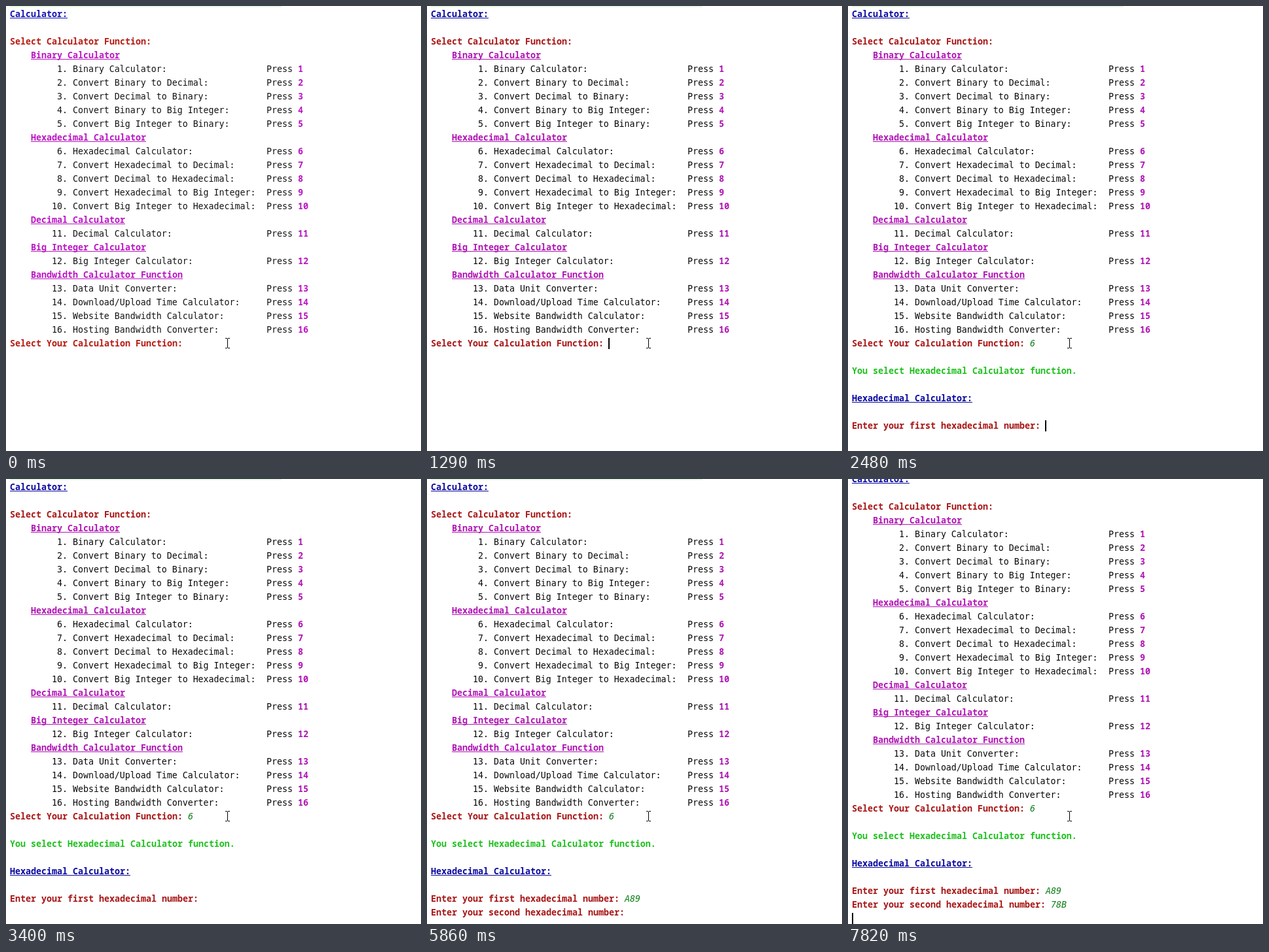
These frames come from a looping animation (634x681 px, 8 s). An HTML page with a canvas:

```html
<!DOCTYPE html>
<html lang="en">
<head>
<meta charset="utf-8">
<title>Calculator console</title>
<style>
  html, body { margin: 0; width: 100%; height: 100%; overflow: hidden; background: #fff; }
  canvas { display: block; }
</style>
</head>
<body>
<canvas id="stage" width="634" height="681"></canvas>
<script>
const LOOP = 8000, LEFT = 6, CELL = 8, LINE = 21, BASELINE = 17;
const REGULAR = '13.28px "DejaVu Sans Mono", monospace';
const ITALIC = 'italic ' + REGULAR;
const BOLD = '600 13.33px "Noto Sans Mono", monospace';
const BRIGHT = { text: '#141414', red: '#b71c14', magenta: '#bb16c4', blue: '#1414b4' };
const NORMAL = { text: '#080808', red: '#a81616', magenta: '#b014b4', blue: '#0a0aa0' };
const GREEN = '#1fc01f', INPUT = '#0b7d16';

const menu = [
  ['Binary Calculator', 'Binary Calculator', 'Convert Binary to Decimal', 'Convert Decimal to Binary',
    'Convert Binary to Big Integer', 'Convert Big Integer to Binary'],
  ['Hexadecimal Calculator', 'Hexadecimal Calculator', 'Convert Hexadecimal to Decimal',
    'Convert Decimal to Hexadecimal', 'Convert Hexadecimal to Big Integer', 'Convert Big Integer to Hexadecimal'],
  ['Decimal Calculator', 'Decimal Calculator'],
  ['Big Integer Calculator', 'Big Integer Calculator'],
  ['Bandwidth Calculator Function', 'Data Unit Converter', 'Download/Upload Time Calculator',
    'Website Bandwidth Calculator', 'Hosting Bandwidth Converter']
];

// Start time, then row and column; without a position the caret is hidden.
const caretSteps = [
  [0], [310, 24, 34], [790], [1290, 24, 34], [1790, 24, 35], [2180, 25, 0],
  [2480, 30, 37], [3400], [3680, 30, 38], [4180, 30, 39], [4380, 30, 40], [4870],
  [5050, 31, 0], [5240, 31, 38], [5860], [6250, 31, 39], [6530, 31, 40], [7030, 31, 41],
  [7820, 32, 0]
];

const ctx = document.getElementById('stage').getContext('2d');

function rect(color, x, y, w, h) {
  ctx.fillStyle = color;
  ctx.fillRect(x, y, w, h);
}

function write(row, col, text, color, font = BOLD) {
  ctx.font = font;
  ctx.fillStyle = color;
  ctx.fillText(text, LEFT + col * CELL, BASELINE + row * LINE);
}

function heading(row, col, text, color) {
  write(row, col, text, color);
  rect(color, LEFT + col * CELL, BASELINE + 1 + row * LINE, text.length * CELL, 1);
}

function typed(row, col, text, t, keyTimes) {
  const count = keyTimes.filter(time => t >= time).length;
  write(row, col, text.slice(0, count), INPUT, ITALIC);
}

function drawMenu(colors) {
  let row = 3, number = 1;
  for (const [title, ...items] of menu) {
    heading(row++, 4, title, colors.magenta);
    for (const item of items) {
      write(row, 8, `${number}.`.padStart(3) + ` ${item}:`, colors.text, REGULAR);
      write(row, 49, 'Press', colors.text, REGULAR);
      write(row++, 55, String(number++), colors.magenta);
    }
  }
}

function drawCaret(t) {
  const [, row, col] = caretSteps.filter(step => t >= step[0]).pop();
  if (row) rect('#000', Math.floor(LEFT + col * 7.98), 4 + row * LINE, 2, 17);
}

function drawPointer() {
  rect('#000', 338, 509, 1, 14);
  for (const y of [508, 523]) {
    rect('#000', 335, y, 3, 1);
    rect('#000', 339, y, 3, 1);
  }
}

function draw(t) {
  const colors = t < 110 ? BRIGHT : NORMAL;
  rect('#fff', 0, 0, 634, 681);
  ctx.save();
  if (t >= 7820) ctx.translate(0, -12);
  rect('#e8f8e4', LEFT, 0, 415, 2);
  heading(0, 0, 'Calculator:', colors.blue);
  write(2, 0, 'Select Calculator Function:', colors.red);
  drawMenu(colors);
  write(24, 0, 'Select Your Calculation Function:', colors.red);
  typed(24, 34, '6', t, [1790]);
  if (t >= 2480) {
    write(26, 0, 'You select Hexadecimal Calculator function.', GREEN);
    heading(28, 0, 'Hexadecimal Calculator:', colors.blue);
    write(30, 0, 'Enter your first hexadecimal number:', colors.red);
    typed(30, 37, 'A89', t, [3680, 4180, 4380]);
  }
  if (t >= 5240) {
    write(31, 0, 'Enter your second hexadecimal number:', colors.red);
    typed(31, 38, '78B', t, [6250, 6530, 7030]);
  }
  drawCaret(t);
  ctx.restore();
  drawPointer();
}

const start = performance.now();
function tick() {
  draw((performance.now() - start) % LOOP);
  requestAnimationFrame(tick);
}
tick();
</script>
</body>
</html>
```
